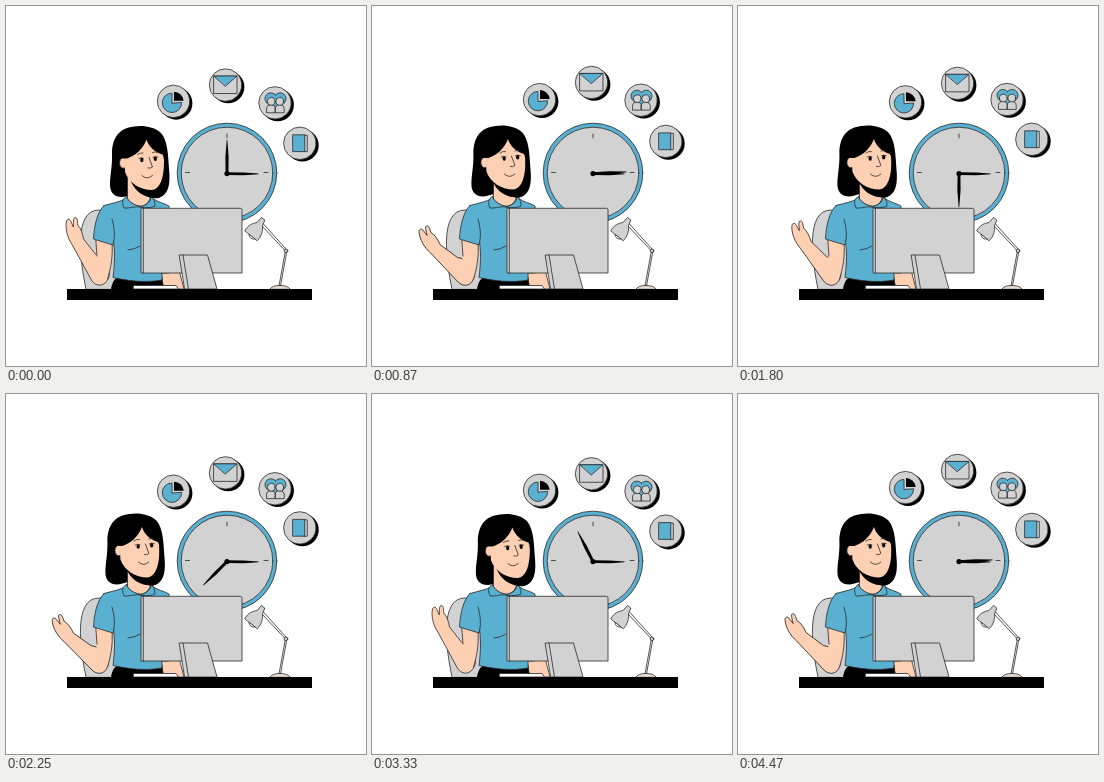
An HTML page that plays this animation: 360x360 px, repeating every 4.5 s.

```html
<!DOCTYPE html>
<html lang="en">
<head>
<meta charset="utf-8">
<title>Office time</title>
<style>
html, body { margin: 0; width: 100%; height: 100%; overflow: hidden; background: #fff; }
svg { display: block; width: 100vw; height: 100vh; }
.ink { stroke: #2a2a2a; stroke-width: .8; stroke-linejoin: round; stroke-linecap: round; }
.blue { fill: #5ab0d1; }
.grey { fill: #d2d2d2; }
.skin { fill: #fdcfb3; }
.none { fill: none; }
</style>
</head>
<body>
<svg viewBox="0 0 360 360">
  <g id="clock">
    <circle class="blue ink" cx="221" cy="167" r="49.8"/>
    <circle class="grey ink" cx="221" cy="167" r="45.8"/>
    <path class="ink none" d="M221 128v4M179.500 166.500h4M258 166.500h4"/>
    <path d="M221 166.200L238 166.500L252.500 167.600V168.300L238 169.200L221 169z"/>
    <path id="minute" d="M219.600 168L219.400 151L220.700 134H221.300L222.600 151L222.400 168z"/>
    <circle cx="221" cy="167.600" r="2.600"/>
  </g>

  <g id="icons">
    <g transform="translate(167.500 95.600)">
      <path class="blue ink" d="M-1.500 1.500V-8.200A9.700 9.700 0 1 0 8.200 1.500z"/>
      <path d="M.5-.5V-9.500A9.800 9.800 0 0 1 10.200-.5z"/>
    </g>
    <g transform="translate(219.500 78.200)">
      <path class="grey ink" d="M-11.500-9H11.500V8.500H-11.500z"/>
      <path class="blue ink" d="M-11.500-9H11.500L0 1z"/>
    </g>
    <g transform="translate(269 95.200)">
      <path class="blue ink" d="M.5-8C-3-12-10-10-10-4C-10 0-4 4 .5 7C5 4 11 0 11-4C11-10 4-12 .5-8z"/>
      <path class="grey ink" d="M-8.500 9.500V6Q-8.500 2-4 2T.2 6V9.500zM.2 9.500V6Q.2 2 4.700 2T9.200 6V9.500z"/>
      <circle class="grey ink" cx="-3.800" cy="-1.500" r="3.900"/>
      <circle class="grey ink" cx="4.700" cy="-1.500" r="3.900"/>
    </g>
    <g transform="translate(293.800 135.300)">
      <path class="grey ink" d="M4.500-8H7.500V8.300H4.500z"/>
      <path class="blue ink" d="M-6.800-8.500H5V8.300H-6.800z"/>
    </g>
  </g>

  <path class="grey ink" d="M80 283C74 255 67 204 93 204C110 204.500 113 240 112 283z"/>
  <path d="M105 283C106 277 108 273 112 271H158V283z"/>
  <path class="skin ink" d="M155 264H173L178 283H158z"/>
  <path class="blue ink" d="M98 199.500C107 197 114 196 121 192H146C151 196 158 197 163 200V267H156V274C140 277 122 275 107 271.500C109 255 109 245 107 232L97 215z"/>
  <path class="ink none" d="M122 244Q129 243.500 134 240"/>

  <g id="arm">
    <path class="skin ink" d="M66 238.500C61.500 232 59.200 223 60.300 216C61 212.300 63.800 212.300 65 215.500L67.300 221C67.600 217 67 212 69 211.500C71.600 211.300 71.600 215 71.700 219C75 222 76.700 228 77.500 233L91 250C104 256 107 270 99 277C94 281 89 279 86 275z"/>
  </g>
  <path class="skin" d="M89.500 234L106 237C107 250 105 262 101.500 273L91 266z"/>
  <path class="ink none" d="M106 237C107 250 105 262 101.500 273M89.800 234L91 250"/>
  <path class="blue ink" d="M98 199.500C91 206 88 221 87.500 233Q97 236 107 239C109 231 109 224 106 213"/>

  <path id="hair" d="M128 120.500C137 119 148 120.500 155 127C162 135 162 150 163 163C164.500 178 163 189 152 192C145 193 137 190 132 187L121 190C112 193 104 189 104 179C104 169 106.500 160 106 148C106 132 113 122 128 120.500z"/>
  <path class="skin ink" d="M121.500 166V193C127 201 139 204 144 193V166z"/>
  <path class="blue ink" d="M120.500 190.500C115.500 193 116 197 118 202C124 202.500 130 199.500 135 201.500C141 201.500 146 202 149 200C149 196 148 192.500 145 190.500C145 196 140 199.500 135 200.500C129 199.500 122 196 120.500 190.500z"/>
  <g id="face">
    <path d="M122 166C125 178 136 185 158 180C161 186 158 191 151 192C136 192 126 184 122 166z"/>
    <path class="skin" d="M119 147V166C123 177 134 184 146 184C154 183 158 172 158 156V138L140 128z"/>
    <ellipse class="skin ink" cx="117.500" cy="157" rx="4" ry="5.200"/>
    <path class="skin" d="M119 152H124V163H119z"/>
    <path d="M140.500 133.500C137 143 129 150 121 152.500L113 152C111 139 119 124 131 122C146 120 157 128 160 142L161 166H158.200C158.500 158 158.300 151 156.500 148.500C149 146 143 141 140.500 133.500z"/>
    <g id="features">
      <path class="ink none" d="M131.500 148.500Q134 146.300 137 147M146.500 146.500Q149 145 151.500 146.500M143 151.500L146.500 161Q144.500 162.800 142 162M136 169.500Q141 174.500 146.500 169.500"/>
      <g id="open">
        <ellipse cx="135.800" cy="154" rx="1.600" ry="2.300"/>
        <ellipse cx="149.300" cy="152.800" rx="1.600" ry="2.300"/>
        <path class="ink none" d="M132.800 152.500Q135 151 137.500 152.300M147 151.300Q149 150 151.800 151"/>
      </g>
      <path id="shut" class="ink none" d="M133 154Q136 155.800 138.500 153.800M147 153Q149.500 154.500 152 152.500"/>
    </g>
  </g>

  <g id="lamp" class="ink">
    <path class="none" d="M273 280L279.200 246M274.500 280L280.700 246M280.500 243.500L257.500 218M279 244.500L256 220"/>
    <circle class="grey" cx="280" cy="244.800" r="1.800"/>
    <path fill="#fff" d="M243 228Q243 234 249.500 233z"/>
    <path class="grey" d="M239 224.500C242 219 246 217.500 251 216.500L255.500 211.500L258.800 214L256.500 220C257 226 255 231 251.500 234.500z"/>
    <path fill="#e8dcd2" d="M264 283Q266 279.500 274 279.500T284 283z"/>
  </g>

  <path class="grey ink" d="M136 202.300H234.500Q236 202.300 236 204V267H135V203.500z"/>
  <path class="ink none" d="M137.300 202.500V267"/>
  <path fill="#fff" class="ink" d="M127.500 279.500H170L172.500 283H127.500z"/>
  <path class="grey ink" d="M173.500 249H201.500L211 283H179z"/>
  <path class="ink none" d="M177 249L182.500 283"/>
  <path d="M61 283H306V294H61z"/>
</svg>
<script>
const LOOP = 4500, CYCLE = 3600;
const $ = id => document.getElementById(id);
const ease = k => (1 - Math.cos(Math.PI * k)) / 2;
const transform = (el, value) => el.setAttribute("transform", value);

// [time, value] steps joined by smooth easing
const ARM = [[0, 0], [750, -16], [1450, 0], [2220, -16], [3100, 0], [CYCLE, 0]];
const TURN = [[0, 0], [180, 0], [450, 1], [2800, 1], [3400, 0], [CYCLE, 0]];

function at(steps, t) {
  const i = steps.findIndex(s => s[0] > t);
  const [t0, a] = steps[i - 1], [t1, b] = steps[i];
  return a + (b - a) * ease((t - t0) / (t1 - t0));
}

const icons = [...$("icons").children].map(el => {
  const base = el.getAttribute("transform");
  el.insertAdjacentHTML("afterbegin",
    '<circle cx="2.600" cy="2" r="16.300"/><circle class="grey ink" r="16.200"/>');
  return { el, base };
});

// each badge peaks a little later than the one before it
function floatIcons(t) {
  icons.forEach(({ el, base }, i) => {
    const peak = 825 + 325 * i;
    const y = -2 * Math.cos(2 * Math.PI * (t - peak) / CYCLE);
    transform(el, `translate(0 ${y}) ${base}`);
  });
}

function draw(now) {
  const time = now % LOOP, t = time % CYCLE;
  const turn = at(TURN, t);
  const blink = t > 290 && t < 430;
  const shift = `translate(${-4.6 * turn} ${-0.5 * turn})`;

  transform($("minute"), `rotate(${time / 10} 221 167.600)`);
  transform($("arm"), `rotate(${at(ARM, t)} 94 272)`);
  transform($("hair"), shift);
  transform($("face"), shift);
  transform($("features"), `translate(${turn} ${-turn})`);
  $("open").setAttribute("visibility", blink ? "hidden" : "visible");
  $("shut").setAttribute("visibility", blink ? "visible" : "hidden");
  floatIcons(t);
}

function tick() {
  draw(performance.now());
  requestAnimationFrame(tick);
}
tick();
</script>
</body>
</html>
```
